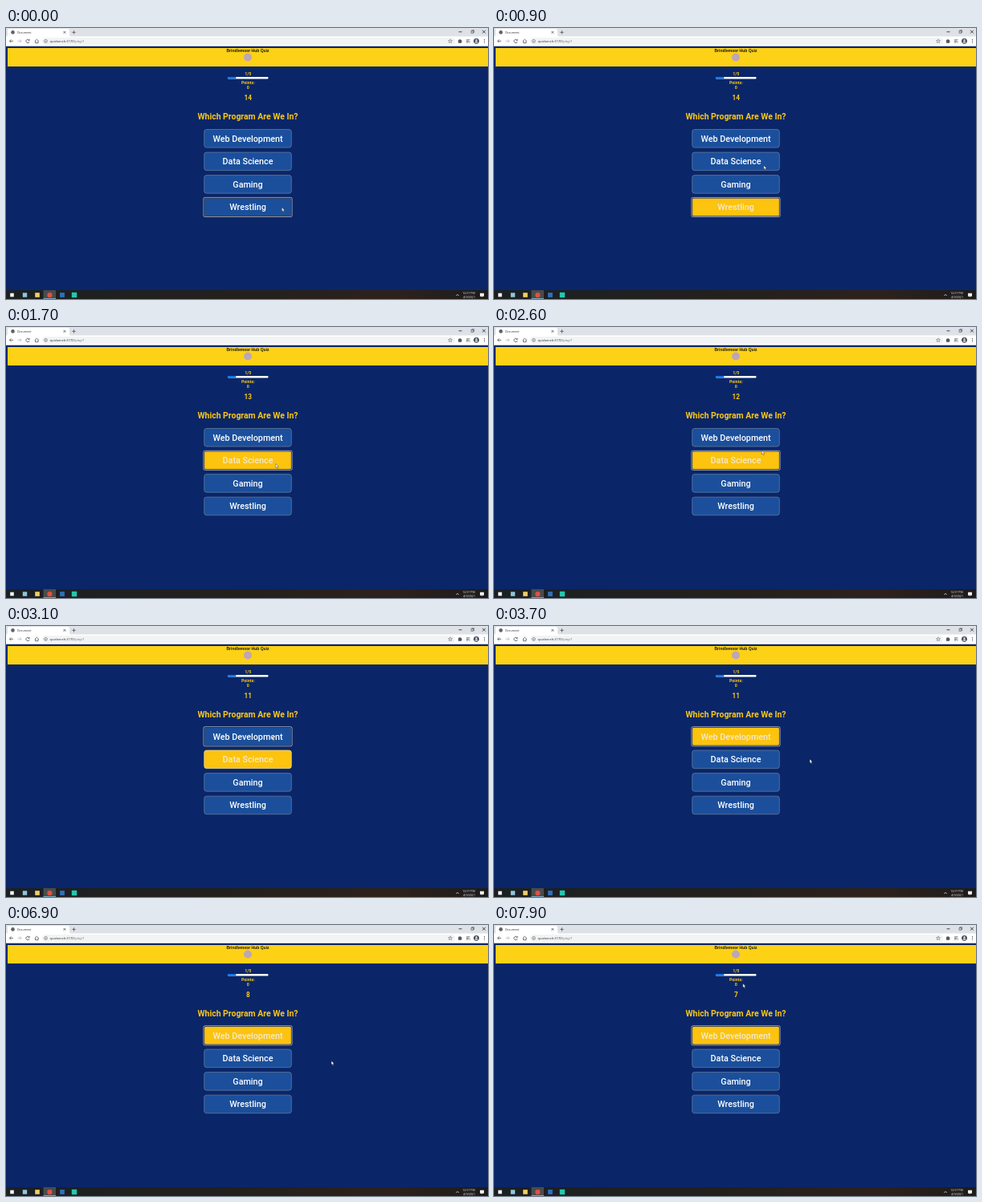
An HTML page that plays this animation: 600x338 px, repeating every 8 s.

```html
<!DOCTYPE html>
<html lang="en">
<head>
<meta charset="utf-8">
<title>Quiz</title>
<style>
  html, body { margin: 0; width: 100%; height: 100%; overflow: hidden; background: #0a2668; }
  svg { display: block; width: 100%; height: 100%; }
  .page { font-family: Roboto, sans-serif; font-weight: 700; text-anchor: middle; fill: #fcc816; }
  .ui { font-family: "Open Sans", sans-serif; font-size: 4.1px; fill: #2b2d30; }
  .small { font-size: 3.6px; }
  .line { fill: none; stroke: #4d5156; stroke-width: .8; }
  .face { fill: #1b4f9c; stroke: #7d8ba0; stroke-width: .6; }
  .label { font-size: 10.75px; font-weight: 500; fill: #fff; }
  .ring { visibility: hidden; fill: none; }
  .chosen .face { fill: #fcc30f; stroke: #f3ead0; }
  .chosen .label { fill: #f4ead0; }
  .focused .ring { visibility: visible; }
</style>
</head>
<body>
<svg viewBox="0 0 600 338" preserveAspectRatio="none">
  <defs>
    <linearGradient id="bar">
      <stop offset="0" stop-color="#1b2022"/>
      <stop offset=".5" stop-color="#24201c"/>
      <stop offset=".8" stop-color="#2e211b"/>
      <stop offset="1" stop-color="#1d1b1b"/>
    </linearGradient>
  </defs>
  <rect width="600" height="338" fill="#0a2668"/>

  <!-- Browser frame -->
  <rect width="600" height="11" fill="#dee1e6"/>
  <path d="M0 11Q2 11 2 9V2.500Q2 1 4 1H77Q79 1 79 2.500V9Q79 11 81 11Z" fill="#fff"/>
  <rect y="10.500" width="600" height="12" fill="#fff"/>
  <rect y="22.300" width="600" height=".7" fill="#d4d7dc"/>
  <rect x="45" y="12" width="514" height="9" rx="4.500" fill="#f1f3f4"/>
  <circle cx="8.500" cy="5.400" r="2.300" fill="#5f6368"/>
  <g class="ui">
    <text class="small" x="14" y="6.800">Document</text>
    <text x="54.500" y="18">quizbench:3170<tspan fill="#74787d">/play/1</tspan></text>
  </g>
  <g class="line">
    <path d="M71.500 4l2.800 2.800m0-2.800l-2.800 2.800M82.300 5.400h4.400m-2.200-2.200v4.400"/>
    <path d="M9 16.300H4.500m2-2l-2 2 2 2"/>
    <path d="M14.500 16.300H19m-2-2l2 2-2 2" stroke="#b4b7ba"/>
    <path d="M28.700 15a2.200 2.200 0 1 0 .5 2m0-3v1.500h-1.600"/>
    <path d="M35.800 16.500l2.500-2.400 2.500 2.400m-4.200-.4v2.600h3.400v-2.600"/>
    <circle cx="49.500" cy="16.300" r="1.900" stroke-width=".6"/>
    <path d="M49.500 16v1.300" stroke-width=".6"/>
    <path d="M553 13.900l.7 1.600 1.700.1-1.300 1.100.4 1.700-1.500-.9-1.500.9.400-1.700-1.300-1.100 1.700-.1z" stroke-width=".5"/>
    <path d="M573 14.800h4.500m-4.500 1.600h3m-3 1.600h2.500m1.500-1.500v2"/>
    <path d="M563.500 4.800h4m25.500-2l3.800 3.800m0-3.800l-3.800 3.800" stroke="#202124"/>
    <path d="M579 3.600h2.700v2.700h-2.700zm.9 0v-.8h2.700v2.700h-.9" stroke-width=".5" stroke="#202124"/>
  </g>
  <path d="M563 14.800h1.200a.8.800 0 0 1 1.600 0h1.200v1.200a.8.800 0 0 1 0 1.600v1.200h-4z" fill="#55595d"/>
  <circle cx="585.500" cy="16.300" r="3.400" fill="#3e4654"/>
  <circle cx="585.500" cy="15.300" r="1.200" fill="#d9dce1"/>
  <path d="M583.400 18.500a2.100 1.900 0 0 1 4.200 0z" fill="#d9dce1"/>
  <path d="M595.500 14v1m0 .8v1m0 .8v1" stroke="#4d5156"/>

  <!-- Quiz page -->
  <rect x="2" y="25" width="598" height="23" fill="#fcd116"/>
  <circle cx="301" cy="36.500" r="5" fill="#bda6b6"/>
  <rect x="276" y="61" width="50.500" height="2.500" rx="1.100" fill="#fff"/>
  <path d="M277 61h9.300v2.500H277a1.250 1.250 0 0 1 0-2.500z" fill="#1774e8"/>
  <g class="page">
    <text x="301" y="29.600" font-family="Liberation Sans, sans-serif" font-size="5" fill="#17180f">Brindlemoor Hub Quiz</text>
    <g font-size="5.300">
      <text x="301.300" y="58.500">1/5</text>
      <text x="301.300" y="69.700">Points:</text>
      <text x="301.300" y="75.600">0</text>
    </g>
    <text id="count" x="301.300" y="90.300" font-size="8.200">14</text>
    <text x="301" y="114.400" font-size="10.450">Which Program Are We In?</text>
    <g id="answers"></g>
  </g>

  <!-- Taskbar -->
  <rect y="327" width="600" height="11" fill="url(#bar)"/>
  <rect x="46.500" y="327" width="15.500" height="11" fill="#4a4b4b"/>
  <rect x="46.500" y="337.200" width="15.500" height=".8" fill="#84b9dd"/>
  <g id="icons"></g>
  <circle cx="54.400" cy="333" r="3.100" fill="#e0523f"/>
  <path class="line" d="M560.300 334l1.700-1.700 1.700 1.700" style="stroke:#e8e8e8"/>
  <g class="ui small" text-anchor="middle" style="fill:#eee">
    <text x="576" y="331.800">12:57 PM</text>
    <text x="576.500" y="337">4/9/2021</text>
  </g>
  <path d="M590 330.800h5v4h-2l-1.200 1.300v-1.300h-1.800z" fill="#eee"/>

  <path id="cursor" d="M0 0V4.900l1.100-1 .9 1.900.9-.4-.9-1.800h1.500z" fill="#fff" stroke="#111" stroke-width=".35"/>
</svg>
<script>
  const LOOP = 8000;
  const byId = id => document.getElementById(id);
  const count = byId("count"), cursor = byId("cursor"), answers = byId("answers");

  answers.innerHTML = ["Web Development", "Data Science", "Gaming", "Wrestling"].map((text, i) => `
    <g transform="translate(301 ${137.8 + i * 28.55})">
      <rect class="face" x="-54.3" y="-11.3" width="108.600" height="22.600" rx="3"/>
      <g class="ring">
        <rect x="-55" y="-12" width="110" height="24" rx="1.500" stroke="#f2f2f2" stroke-width=".7"/>
        <rect x="-54.3" y="-11.3" width="108.600" height="22.600" rx="1.500" stroke="#101522" stroke-width=".7"/>
      </g>
      <text class="label" y="3.800">${text}</text>
    </g>`).join("");

  byId("icons").innerHTML = [[7.5, "#f4f4f4", 4.6], [23.5, "#8fc7dc", 5.4], [39, "#f3cf62", 5.6],
    [70, "#2f6fc0", 5.8], [85, "#20c9b0", 6.4]].map(([x, color, size]) =>
    `<rect x="${x - size / 2}" y="${333 - size / 2}" width="${size}" height="${size}" fill="${color}"/>`).join("");

  // Cursor stops: time, x, y
  const path = [
    [0, 343.4, 223.8], [280, 343.4, 223.8], [300, 349, 222], [550, 349, 222],
    [880, 335.8, 171.4], [1450, 335.8, 171.4], [1600, 335.8, 170.6], [2400, 335.8, 170.6],
    [2800, 331, 137.6], [3300, 331, 137.6], [3700, 393, 166], [5050, 393, 166],
    [5500, 405, 169.400], [6920, 405, 169.400], [7700, 320, 108], [7900, 309.8, 73], [LOOP, 309.8, 73]
  ];

  function cursorAt(t) {
    const i = path.findIndex(p => p[0] > t);
    const [t0, x0, y0] = path[i - 1], [t1, x1, y1] = path[i];
    const p = (t - t0) / (t1 - t0), k = p * p * (3 - 2 * p);
    return [x0 + (x1 - x0) * k, y0 + (y1 - y0) * k];
  }

  function draw(now) {
    const t = now % LOOP;
    // A press moves the focus; the release picks the answer.
    const focused = t < 1500 ? 3 : t < 3000 ? 1 : 0;
    const chosen = t < 100 ? -1 : t < 1600 ? 3 : t < 3300 ? 1 : 0;
    [...answers.children].forEach((answer, i) => {
      answer.classList.toggle("focused", i === focused);
      answer.classList.toggle("chosen", i === chosen);
    });
    count.textContent = 14 - Math.floor((t + 70) / 1000 % 8);
    if (t + 70 >= LOOP) count.textContent = 7;
    cursor.setAttribute("transform", `translate(${cursorAt(t)})`);
  }

  const start = performance.now();
  function tick() {
    draw(performance.now() - start);
    requestAnimationFrame(tick);
  }
  tick();
</script>
</body>
</html>
```
